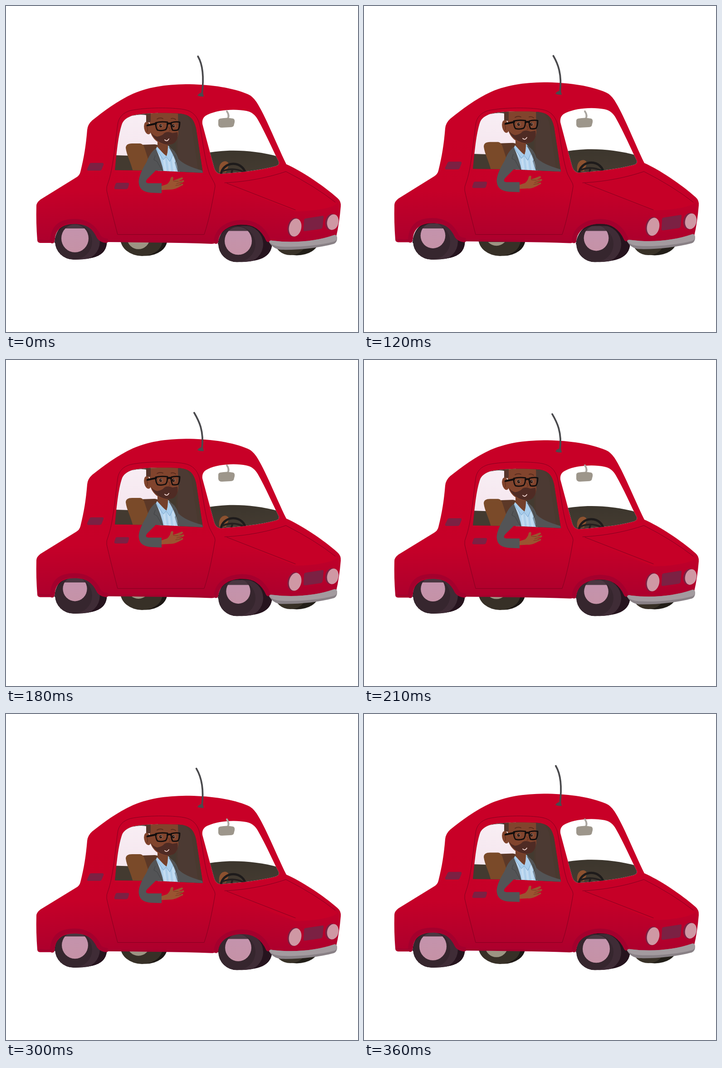
These frames come from a looping animation (776x721 px, 0.39 s). An HTML page with a canvas:

```html
<!DOCTYPE html>
<html>
<head>
<meta charset="utf-8">
<title>Red car</title>
<style>
html, body { margin: 0; width: 100%; height: 100%; overflow: hidden; background: #fff; }
canvas { display: block; }
</style>
</head>
<body>
<canvas id="stage" width="776" height="721"></canvas>
<script>
const ctx = document.getElementById('stage').getContext('2d');
const LOOP = 390, STEP = 30, GROUND = 724, SQUASH = 0.0122;

const wave = (t, peak) => Math.cos((t - peak) / LOOP * Math.PI * 2);
const fill = (d, color) => { ctx.fillStyle = color; ctx.fill(new Path2D(d)); };
const line = (d, color, width = 1) => {
  ctx.strokeStyle = color;
  ctx.lineWidth = width;
  ctx.stroke(new Path2D(d));
};
const oval = (x, y, rx, ry, color, tilt = 0) => {
  ctx.fillStyle = color;
  ctx.beginPath();
  ctx.ellipse(x, y, rx, ry, tilt, 0, Math.PI * 2);
  ctx.fill();
};
const fade = (y0, y1, ...colors) => {
  const g = ctx.createLinearGradient(0, y0, 0, y1);
  colors.forEach((c, i) => g.addColorStop(i / (colors.length - 1), c));
  return g;
};
const layer = (draw, clip) => {
  ctx.save();
  if (clip) ctx.clip(new Path2D(clip));
  draw();
  ctx.restore();
};

const BODY = `M69 518 Q66 480 67 442 Q67 435 76 428 L155 379 Q162 375 164 367 C172 335 176 310 179 274
  Q180 262 190 253 C215 233 245 210 280 194 C320 177 360 173 405 173 C455 174 500 181 533 195
  Q543 199 552 212 C572 243 593 298 618 350 C650 364 700 397 731 425 Q739 432 738 443
  Q735 480 728 510 L725 522 L600 534 Q588 532 581 524 C574 502 558 487 530 484
  C500 481 475 491 468 514 Q466 526 453 526 C380 523 300 523 222 522 Q205 521 201 512
  C192 490 174 482 151 482 C125 482 110 494 108 515 Q107 524 98 524 L75 524 Q69 523 69 518Z`;
const SIDE_WINDOW = `M240 363 C244 325 247 286 256 260 Q261 248 280 242 C305 236 350 236 382 238
  C406 240 414 250 419 271 L434 369 L330 364Z`;
const WINDSHIELD = `M433 261 Q431 246 445 240 C468 229 505 227 530 232 Q546 235 555 251
  C573 283 588 318 601 344 Q604 351 595 354 C558 364 515 368 474 371 Q463 371 459 358
  C450 325 441 291 433 261Z`;

function nearWheel(x, y, reach, hub) {
  const tire = `M${x} ${y - 40} A41 40 0 0 0 ${x} ${y + 40} `
    + `C${x + 60} ${y + 40} ${x + reach + 41} ${y + 24} ${x + reach + 41} ${y - 4} `
    + `L${x + reach} ${y - 40}Z`;
  layer(() => {
    fill(tire, '#26141e');
    oval(x + 17, y, 41, 41, '#3f2c36');
    oval(x, y, 41, 40, '#36262e');
    const cx = x + 3, cy = y - 11 + 4 * hub;
    const rx = 28.3 + 1.7 * hub, ry = 29.2 + 1.8 * hub;
    oval(cx, cy, rx, ry, '#4a3741');
    ctx.beginPath();
    ctx.rect(x - 45, y - 29, 90, 80);
    ctx.clip();
    oval(cx, cy, rx, ry, fade(y - 25, y + 30, '#c493ac', '#c692a5'));
  }, tire);
}

function farWheels(hub) {
  oval(309, 514, 47, 38.5, '#201b17');
  oval(300, 514, 48, 39, '#373027');
  layer(() => oval(292, 508 + 5 * hub, 25, 25, '#9c9583'),
    'M240 522 H360 V560 H240Z');
  fill('M322 548 Q344 540 346 515 H356 Q354 544 322 549Z', '#1d1815');
  oval(641, 520, 48, 31.5, '#221e18');
  oval(627, 520, 35, 31, '#383127');
}

function driver() {
  // Seat
  fill('M297 307 L328 306 Q345 308 350 330 L325 365 L305 365Z', '#5c3827');
  fill('M280 366 C275 345 266 330 264 314 Q264 304 278 304 L296 304 Q303 305 306 316 L322 366Z', '#7a4a29');
  // Shirt and jacket
  fill('M332 314 L358 309 L374 327 L384 370 H334Z', '#b9d6ef');
  for (let i = 0; i < 9; i++) line(`M${331 + i * 5} 322 l6 46`, i % 2 ? '#dbe9f7' : '#97bfe3');
  fill('M334 296 L357 296 L357 313 Q357 323 354 332 Q343 324 334 312Z', '#74402b');
  fill('M333 311 L353 333 L347 340 L330 317Z M357 310 L369 327 L361 344 L354 333 Q358 323 357 310Z', '#a9cdeb');
  line('M331 316 L347 340 L353 333 L361 344 L369 328', '#79a7cf');
  fill('M330 315 C320 323 315 332 310 345 L292 385 L320 386 L348 369 Q342 340 330 315Z', '#535456');
  fill('M358 311 Q375 320 380 338 Q393 353 433 364 L435 371 H380 Q377 340 358 311Z', '#535456');
  line('M329 331 L326 340 L333 344 L346 367 M373 330 L377 342 L373 346 L380 368', '#404143');
  // Head
  fill('M309 232 H379 L380 282 C378 302 366 308 353 307 C337 306 323 295 318 278 L317 258 L309 256Z', '#81442d');
  fill('M309 232 H319 L319 256 L309 259Z', '#55342a');
  oval(312, 270, 7.5, 14, '#81442d', -0.2);
  fill(`M318 276 Q322 286 333 289 Q345 287 349 281 Q356 276 367 281 L378 279
    Q381 294 371 303 C358 312 328 304 318 276Z`, '#4f2b24');
  line('M309 264 Q314 270 311 278', '#63301f', 1.5);
  line('M350 296 Q355 301 359 294', '#f1d3cf', 1.8);
  line('M333 250 Q339 246 346 249 M364 249 Q369 247 374 251', '#55291d', 1.7);
  line('M358 268 Q365 275 359 277', '#6a3320', 1.3);
  for (const x of [341, 369]) {
    oval(x, 265, 4.4, 4.2, '#b98d75');
    oval(x, 265, 3.4, 3.8, '#2a1712');
    oval(x + 1, 264, 0.8, 0.8, '#fff');
  }
  // Glasses
  line('M312 264 L331 260 M356 261 Q360 258 364 261', '#110d0d', 4);
  line(`M330 258 Q342 255 356 257 Q356 269 352 273.5 Q343 277 334 274.5 Q330 270 330 258Z
    M364 258 Q374 255 383 257 Q383 269 379 274 Q373 276 367 274.5 Q364 268 364 258Z`, '#110d0d', 2.8);
}

function sideWindow() {
  layer(() => {
    fill('M235 230 H440 V375 H235Z', '#433a30');
    fill('M235 230 H335 V333 L240 330Z', fade(238, 332, '#f8eef4', '#f5e6ee'));
    fill('M278 243 Q298 236 312 232 V242 Q297 238 278 243Z', '#4b3b34');
    fill('M374 230 H440 V375 H375Z', '#49392f');
    fill('M376 230 Q400 236 408 260 L424 366 L384 350 Q374 320 381 276Z', '#4c3a33');
    driver();
  }, SIDE_WINDOW);
}

function restingArm() {
  fill(`M317 335 C306 350 290 378 293 393 Q295 411 320 413 L343 414 L343 392
    L314 392 Q305 391 311 383 L329 365 L334 350Z`, '#535456');
  fill(`M343 398 L355 394 Q362 388 363 380 Q367 375 369 380 L368 386 Q378 383 387 379
    Q392 379 389 383 L380 388 L391 385 Q395 387 390 390 L381 394 L390 393 Q392 396 386 398
    Q371 407 361 406 L343 407Z`, '#9b5431');
  line('M369 387 L380 388 M376 393 L388 389 M374 397 L386 395', '#74391f');
}

function windshield() {
  layer(() => {
    ctx.fillStyle = '#fff';
    ctx.fillRect(425, 220, 190, 160);
    fill('M440 326 C480 317 545 316 610 336 V380 H440Z', fade(320, 370, '#3c362d', '#443b31'));
    fill('M470 368 Q468 351 477 345 Q487 340 492 350 L485 368Z', '#8c512f');
    ctx.strokeStyle = '#1e1b1b';
    ctx.lineWidth = 5;
    ctx.beginPath();
    ctx.ellipse(501, 374, 27, 25, 0, 0, Math.PI * 2);
    ctx.stroke();
    line('M479 365 Q500 356 524 367 M499 362 L496 374', '#24201f', 4);
  }, WINDSHIELD);
}

function bodyDetails() {
  const trim = '#7b2143';
  line('M102 520 C103 490 119 476 151 476 C179 476 195 489 205 511 Q210 518 221 519', '#a4002d', 10);
  line('M463 521 C466 493 490 479 520 478 C551 478 568 494 578 517', '#a4002d', 10);
  line('M72 518 Q90 521 103 518 M223 520 Q340 520 455 523', '#a2002c', 3);
  fill('M188 347 H213 Q216 348 215 351 L211 361 Q210 364 206 364 H181 Q178 363 179 360 L184 350 Q185 347 188 347Z', trim);
  fill('M245 391 H268 Q272 391 271 395 L269 402 Q268 405 264 405 H241 Q238 404 239 401 L241 395 Q242 391 245 391Z', trim);
  fill('M660 470 L698 464 Q701 464 700 468 L698 489 Q697 492 694 493 L659 498 Q655 498 656 494 L657 473 Q657 471 660 470Z', trim);
  oval(635, 489.5, 14, 21, trim, 0.22);
  oval(637.5, 490, 13.5, 20, '#cf98a4', 0.22);
  oval(717, 477.5, 13, 18, trim, 0.22);
  oval(720.5, 478, 12.5, 17.5, '#cf98a4', 0.22);
  fill(`M580 522 Q581 517 588 519 C635 525 685 520 722 507 Q729 504 730 513 Q730 523 723 526
    C690 535 645 540 606 539 Q588 537 580 522Z`, '#898186');
  fill(`M580 522 Q581 517 588 519 C635 525 685 520 722 507 Q729 504 730 513 Q729 519 723 521
    C690 530 640 534 606 532 Q588 531 580 522Z`, '#a39b9f');
}

function seams() {
  line(`M246 505 C237 470 228 435 222 408 Q221 400 225 391 C236 360 240 310 246 263
    Q249 238 275 231 C310 224 365 224 393 229 Q420 234 427 263 C434 300 439 345 449 372
    L460 393 Q462 398 460 405 C454 440 447 475 437 505Z`, '#82001f');
  line('M482 391 C530 389 580 379 617 366 Q680 398 726 434 M487 392 L638 451', '#82001f');
}

function mirror() {
  line('M487 233 Q493 242 489 249', '#aaa6a1', 4);
  fill('M472 249 Q487 246 501 249 Q505 251 504 257 L502 265 Q500 268 495 268 L476 269 Q469 269 468 263 V254 Q468 250 472 249Z', '#9d968b');
}

function antenna(baseY, sway) {
  const tipX = 419 + 4.2 * sway, tipY = baseY - 83.5 - 2 * sway;
  line(`M${tipX} ${tipY} C${tipX + 10} ${tipY + 17} 437 ${baseY - 42} 432 ${baseY - 2}`, '#4a4a4d', 3.8);
  fill(`M422 ${baseY + 1} Q425 ${baseY - 4} 430 ${baseY - 5} H434 L436 ${baseY + 3} Q428 ${baseY + 4} 422 ${baseY + 1}Z`, '#4a4a4d');
}

function draw(t) {
  ctx.fillStyle = '#fff';
  ctx.fillRect(0, 0, 776, 721);
  ctx.lineCap = ctx.lineJoin = 'round';
  const stretch = (1 + SQUASH * wave(t, 84)) / (1 + SQUASH * wave(0, 84));
  const hub = wave(t, -15);

  farWheels(hub);
  // Dark wheel wells behind the near tires
  fill('M107 524 C110 460 192 460 204 524Z M467 527 C474 462 564 462 581 527Z', '#2a1720');
  nearWheel(149, 521, 33, hub);
  nearWheel(509, 526.5, 37, hub);

  layer(() => {
    ctx.translate(0, GROUND);
    ctx.scale(1, stretch);
    ctx.translate(0, -GROUND);
    fill(BODY, fade(173, 525, '#c80027', '#c80027', '#c60028', '#ac002d'));
    fill(`M484 392 C535 389 580 379 617 366 Q680 398 731 436 C720 447 680 454 638 454
      Q560 425 484 392Z`, '#c60027');
    bodyDetails();
    sideWindow();
    restingArm();
    windshield();
  });
  seams();
  mirror();
  antenna(GROUND + (197 - GROUND) * stretch, wave(t, -2));
}

function tick(now) {
  draw(Math.floor((now % LOOP) / STEP) * STEP);
  requestAnimationFrame(tick);
}
draw(0);
requestAnimationFrame(tick);
</script>
</body>
</html>
```
